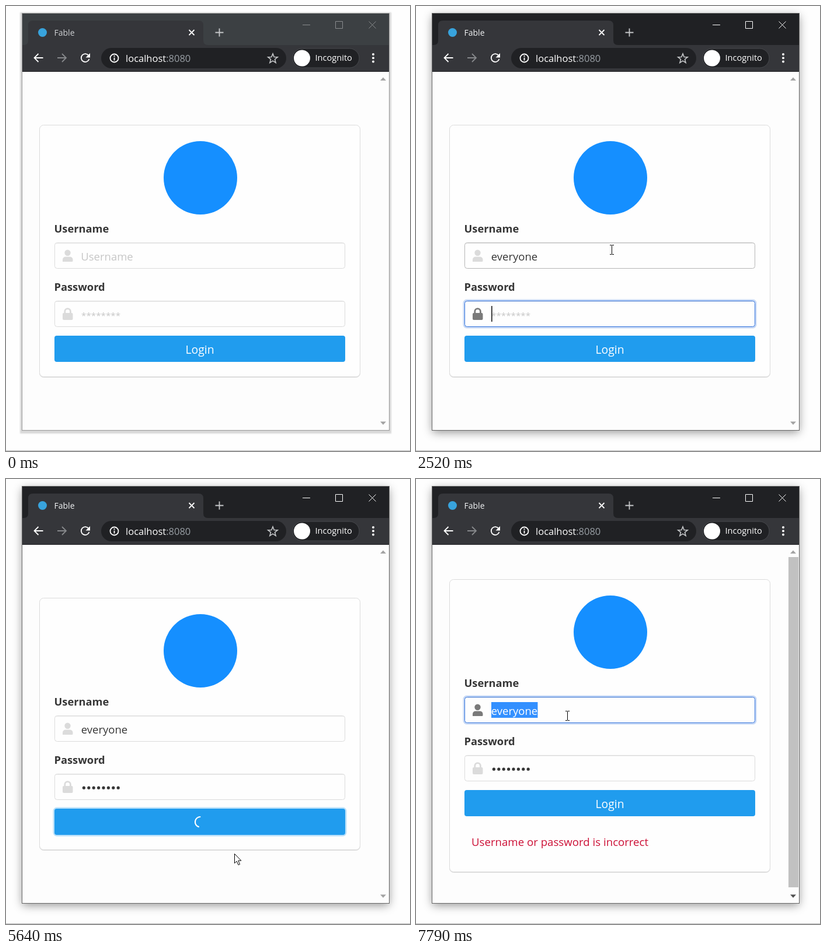
Recreate the animation shown at these times as an HTML page. Size 692 px wide and 764 px high, loop 8000 ms.

```html
<!DOCTYPE html>
<html lang="en">
<head>
<meta charset="utf-8">
<title>Login form</title>
<style>
  html, body { margin: 0; width: 100%; height: 100%; overflow: hidden; background: #fefefe; }
  #window { position: absolute; left: 28px; top: 13px; width: 628px; height: 715px; background: #fdfdfd;
    box-shadow: 0 0 0 1px #999, 0 2px 2px 4px rgba(0,0,0,.15); }
  .active #window { box-shadow: 0 0 0 1px #666, 0 4px 15px rgba(0,0,0,.42); }
  svg { position: absolute; left: 0; top: 0; }
  text { font-family: "Open Sans", "Noto Sans", sans-serif; font-size: 18.5px; fill: #363636; white-space: pre; }
  .label { font-weight: 700; font-size: 18.3px; }
  .hint { fill: #c6c6c6; }
  .line { fill: none; stroke: #fff; stroke-width: 1.8; }
  #titlebar { fill: #3c4043; }
  .active #titlebar { fill: #202124; }
  #controls { fill: none; stroke: #8a8c8e; }
  .active #controls { stroke: #fff; }
  #tabTitle { font-size: 14px; fill: #ced0d3; }
  .active #tabTitle { fill: #f1f3f4; }
  #card { fill: #fefefe; stroke: #dbdbdb; filter: drop-shadow(0 1px .5px rgba(0,0,0,.13)); }
  .box { fill: #fefefe; stroke: #dbdbdb; }
  .ring { fill: none; stroke: rgba(50,115,220,.27); stroke-width: 5; visibility: hidden; }
  .inset { stroke: rgba(10,10,10,.07); }
  .icon { fill: #dbdbdb; stroke: #dbdbdb; stroke-width: 0; }
  .hover .box { stroke: #b5b5b5; }
  .focus .box { stroke: #3273dc; }
  .focus .ring { visibility: visible; }
  .focus .icon { fill: #7a7a7a; stroke: #7a7a7a; }
  #button .ring { stroke: rgba(32,156,238,.3); }
</style>
</head>
<body>
<div id="window"></div>
<svg width="692" height="764" viewBox="0 0 692 764">
  <path d="M0 763.5H692" stroke="#b9b9b9"/>

  <path id="titlebar" d="M28 13H656V68H28Z"/>
  <path d="M30 67Q38 67 38 59V33Q38 25 46 25H330Q338 25 338 33V59Q338 67 346 67H656V112H28V67Z" fill="#35363a"/>
  <path d="M28 112.5H656" stroke="#202124"/>
  <circle cx="62.5" cy="45.5" r="7.5" fill="#38a3dc"/>
  <text id="tabTitle" x="82.5" y="50.7">Fable</text>
  <path class="line" d="M313.5 41L322.5 50M322.5 41L313.5 50"/>
  <path class="line" d="M358.5 45.5H372.5M365.5 38.5V52.5" style="stroke:#c6c8ca"/>
  <path id="controls" d="M508 32.5H521M564.5 26.5H576.5V38.5H564.5ZM621.5 26.5L633.5 38.5M633.5 26.5L621.5 38.5"/>
  <path class="line" d="M63.5 89H48.5M55.5 82L48.5 89L55.5 96"/>
  <path class="line" d="M88 89H103M96 82L103 89L96 96" style="stroke:#86888b"/>
  <path class="line" d="M141.5 85A7 7 0 1 0 142.5 91"/>
  <path d="M144 81V88.5H136.5Z" fill="#fff"/>
  <rect x="163" y="72" width="317" height="35" rx="17.5" fill="#202124"/>
  <circle class="line" cx="185.5" cy="89.5" r="7"/>
  <path class="line" d="M185.5 88.5V93.5M185.5 85V87"/>
  <text x="205" y="95.7" style="font-size:16.5px;fill:#fff">localhost<tspan fill="#9aa0a6">:8080</tspan></text>
  <path id="star" class="line" style="stroke:#c6c8ca;stroke-width:1.6"/>
  <rect x="491" y="73" width="114" height="33" rx="16.5" fill="#202124" stroke="#46484c"/>
  <circle cx="507" cy="89.5" r="14" fill="#fff"/>
  <text x="529.5" y="94.3" style="font-size:14.6px;fill:#fff">Incognito</text>
  <g fill="#fff"><circle cx="629" cy="83" r="2"/><circle cx="629" cy="89.3" r="2"/><circle cx="629" cy="95.6" r="2"/></g>

  <path d="M641 128H651L646 122.5Z" fill="#a3a3a3"/>
  <path id="down" d="M641 713.5H651L646 719Z"/>
  <path id="thumb" d="M638 134H655V701H638Z" fill="#c1c1c1"/>

  <g id="form">
    <rect id="card" x="57.5" y="204.5" width="549" rx="7"/>
    <circle cx="333" cy="295" r="63" fill="#158fff"/>
    <text class="label" x="82.5" y="388.7">Username</text>
    <text class="label" x="82.5" y="488.7">Password</text>

    <g id="user">
      <rect class="ring" x="83" y="406" width="498" height="45" rx="4"/>
      <rect class="box" x="83.5" y="406.5" width="497" height="44" rx="4"/>
      <path class="inset" d="M86 407.5H578"/>
      <g class="icon"><circle cx="105.5" cy="423.8" r="5.2"/><path d="M97 439V436Q97 430.5 102.5 430.5H109Q114.5 430.5 114.5 436V437.5Q114.5 439 113 439Z"/></g>
      <text id="userHint" class="hint" x="128.3" y="436.8">Username</text>
      <rect id="selection" x="129" y="415" height="27" fill="#3390ff"/>
      <text id="userText" x="128.8" y="436.8"></text>
    </g>

    <g id="pass">
      <rect class="ring" x="83" y="506" width="498" height="45" rx="4"/>
      <rect class="box" x="83.5" y="506.5" width="497" height="44" rx="4"/>
      <path class="inset" d="M86 507.5H578"/>
      <g class="icon"><rect x="97" y="527" width="17.5" height="12" rx="2"/><path d="M100.8 528V524.5A4.8 4.8 0 0 1 110.4 524.5V528" fill="none" style="stroke-width:2.8"/></g>
      <text id="passHint" class="hint" x="129" y="537" style="font-size:15.2px">********</text>
      <g id="dots" fill="#363636"></g>
    </g>
    <path id="caret" stroke="#222" stroke-width="1.7"/>

    <g id="button">
      <rect class="ring" x="83" y="566" width="498" height="45" rx="4"/>
      <rect x="83" y="566" width="498" height="45" rx="4" fill="#209cee"/>
      <text id="login" x="332" y="597" text-anchor="middle" style="font-size:19.4px;fill:#fff">Login</text>
      <path id="spinner" class="line" d="M-6.2 -6.2A8.8 8.8 0 0 0 6.2 6.2" style="stroke-width:2.2"/>
    </g>
    <text id="error" x="95" y="661.8" style="font-size:18.65px;fill:#cc0f35">Username or password is incorrect</text>
  </g>

  <g id="cursor">
    <path id="arrow" d="M.5 .5V16.7L4.2 13.2L7 19.6L9.5 18.5L6.8 12.2H11.8Z" fill="#fff" stroke="#000"/>
    <path id="beam" d="M-3.5 -8H-1Q0 -8 0 -7Q0 -8 1 -8H3.5M0 -7V7M-3.5 8H-1Q0 8 0 7Q0 8 1 8H3.5" fill="none" stroke="#000"/>
    <path id="hand" d="M-1.5 1Q0 -1 1.5 1V8Q4 6 5 8.5Q7.5 7 8.3 9.5Q11 8.5 11 11.5V16L9 22H0L-6 13Q-6.500 10 -4 11L-1.500 13Z" fill="#fff" stroke="#000"/>
  </g>
</svg>
<script>
const LOOP = 8000, NAME = 'everyone';
const FOCUS = 550, TAB = 2520, SUBMIT = 4560, SPIN = 4567, FAIL = 6060, BLUR = 7190, REFOCUS = 7220, SELECT = 7420;
const nameKeys = [1200, 1380, 1475, 1570, 1780, 1930, 2035, 2140];
const passKeys = nameKeys.map((_, i) => 2900 + i * 590 / 7);
const carets = [FOCUS, ...nameKeys, TAB, ...passKeys, REFOCUS];

// time, x, y
const path = [
  [60, 520, 764], [480, 340, 424], [830, 340, 424], [960, 335, 418],
  [3750, 335, 418], [4450, 374, 601], [4800, 374, 601], [5250, 391, 643],
  [6400, 391, 643], [6750, 271, 464], [7150, 258, 406], [7780, 258, 406], [7790, 259, 406]
];

const $ = id => document.getElementById(id);
const show = (id, on) => $(id).style.display = on ? '' : 'none';
const count = (times, t) => times.filter(k => k <= t).length;

$('star').setAttribute('d', 'M' + Array.from({ length: 10 }, (_, i) => {
  const a = i * Math.PI / 5, r = i % 2 ? 3.7 : 8.6;
  return [457 + r * Math.sin(a), 90.5 - r * Math.cos(a)].map(v => v.toFixed(1)).join(' ');
}).join('L') + 'Z');

$('dots').innerHTML = passKeys.map((_, i) => `<circle cx="${133.4 + i * 8.4}" cy="530.2" r="2.6"/>`).join('');

function pointer(t) {
  const i = path.findIndex(p => p[0] > t);
  if (i < 0) return path[path.length - 1].slice(1);
  if (i === 0) return path[0].slice(1);
  const [a, b] = [path[i - 1], path[i]];
  const u = (t - a[0]) / (b[0] - a[0]), e = u * u * (3 - 2 * u);
  return [a[1] + (b[1] - a[1]) * e, a[2] + (b[2] - a[2]) * e];
}

function focused(t) {
  if (t < FOCUS) return '';
  if (t < TAB) return 'user';
  if (t < SUBMIT) return 'pass';
  if (t < BLUR) return 'button';
  return t < REFOCUS ? '' : 'user';
}

function draw(t) {
  const failed = t >= FAIL, loading = t >= SUBMIT && !failed;
  const shift = failed ? -32 : 0, focus = focused(t);
  document.body.classList.toggle('active', t >= FOCUS);

  const [x, y] = pointer(t);
  const over = top => x > 83 && x < 581 && y > top + shift && y < top + 45 + shift;
  const hover = { user: over(406), pass: over(506), button: over(566) };
  for (const id in hover) {
    $(id).classList.toggle('focus', focus === id);
    $(id).classList.toggle('hover', hover[id]);
  }

  $('form').setAttribute('transform', `translate(0 ${shift})`);
  $('card').setAttribute('height', failed ? 502 : 432);
  $('down').setAttribute('fill', failed ? '#505050' : '#a3a3a3');
  show('thumb', failed);
  show('error', failed);

  const typed = count(nameKeys, t), dots = count(passKeys, t), selected = t >= SELECT;
  const text = $('userText');
  text.textContent = NAME.slice(0, typed);
  text.style.fill = selected ? '#fff' : '';
  const width = typed ? text.getComputedTextLength() : 0;
  show('userHint', !typed);
  show('passHint', !dots);
  show('selection', selected);
  $('selection').setAttribute('width', width);
  [...$('dots').children].forEach((dot, i) => dot.style.display = i < dots ? '' : 'none');

  // The caret restarts its blink on every key and focus change.
  const since = t - carets[Math.max(0, count(carets, t) - 1)];
  const inUser = focus === 'user';
  show('caret', (inUser || focus === 'pass') && !selected && since % 1060 < 530);
  $('caret').setAttribute('d', inUser ? `M${129.8 + width} 415V442` : `M${129.8 + dots * 8.4} 515V542`);

  show('login', !loading);
  show('spinner', loading);
  $('spinner').setAttribute('transform', `translate(332 588.7) rotate(${(t - SPIN) * 0.72})`);

  const beam = hover.user || hover.pass, hand = hover.button && !loading;
  show('cursor', t >= 60);
  $('cursor').setAttribute('transform', `translate(${Math.round(x) + (beam ? 0.5 : 0)} ${Math.round(y) + (beam ? 0.5 : 0)})`);
  show('beam', beam);
  show('hand', hand);
  show('arrow', !beam && !hand);
}

const start = performance.now();
function tick() {
  draw((performance.now() - start) % LOOP);
  requestAnimationFrame(tick);
}
tick();
</script>
</body>
</html>
```
